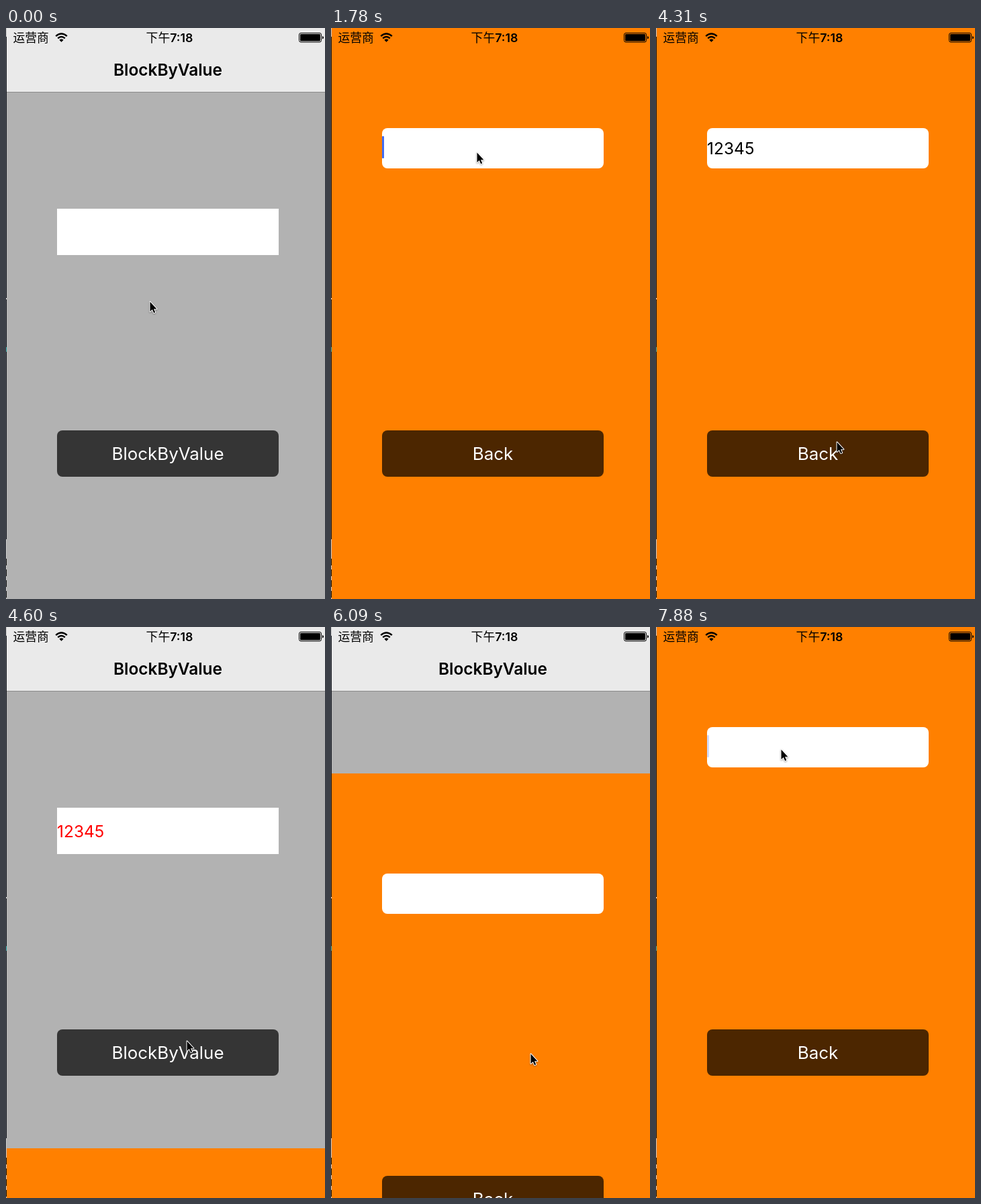
Animation of 475x850 px, one loop 8 s. Source, as an HTML page:

```html
<!DOCTYPE html>
<html lang="zh-CN">
<head>
<meta charset="utf-8">
<title>BlockByValue</title>
<style>
  html, body { margin: 0; width: 100%; height: 100%; overflow: hidden; background: #b2b2b2; }
  svg { display: block; width: 475px; height: 850px; }
  text { font-family: Inter, "Noto Sans CJK SC", "Noto Sans CJK", sans-serif; }
  .mid { text-anchor: middle; }
  .btn { fill: #000; fill-opacity: .7; }
  .btn-text { font-size: 25.9px; fill: #fff; }
  .value { font-size: 24.5px; }
  .status { font-size: 17.8px; }

  /* Every change is a hard step on one 8 s clock */
  .sheet, .label, .digit, .caret, .pointer { animation: 8s step-end infinite; }
  .sheet { animation-name: sheet; }
  .label { animation-name: label; }
  .digit { animation-name: digit; animation-delay: calc(var(--late) - 8s); }
  .caret { animation-name: caret-move, caret-blink; }
  .pointer { animation-name: pointer; }

  @keyframes sheet {
    0% { transform: translateY(850px); }
    11% { transform: translateY(240.5px); }
    12.875% { transform: translateY(28px); }
    14.75% { transform: translateY(3px); }
    16.625% { transform: translateY(0); }
    55.625% { transform: translateY(326px); }
    57.5% { transform: translateY(776px); }
    59.375% { transform: translateY(843px); }
    61.25% { transform: translateY(850px); }
    76.125% { transform: translateY(218px); }
    78% { transform: translateY(25px); }
    79.875% { transform: translateY(2px); }
    81.625%, 100% { transform: translateY(0); }
  }
  @keyframes label {
    0% { visibility: hidden; }
    55.625%, 100% { visibility: visible; }
  }
  /* Each digit goes out again while the sheet is off screen */
  @keyframes digit {
    0% { visibility: hidden; }
    31.625% { visibility: visible; }
    62.875%, 100% { visibility: hidden; }
  }
  @keyframes caret-move {
    0% { transform: translateX(0); }
    31.625% { transform: translateX(10px); }
    35.375% { transform: translateX(25px); }
    39.125% { transform: translateX(40px); }
    40.875% { transform: translateX(56px); }
    44.625% { transform: translateX(71px); }
    62%, 100% { transform: translateX(0); }
  }
  @keyframes caret-blink {
    0% { opacity: 0; }
    22.25% { opacity: 1; }
    29.75% { opacity: .25; }
    31.625% { opacity: 1; }
    52% { opacity: 0; }
    91% { opacity: 1; }
    98.5%, 100% { opacity: .25; }
  }
  @keyframes pointer {
    0% { transform: translate(214px, 407px); }
    1.875% { transform: translate(208px, 432px); }
    3.75% { transform: translate(224px, 530px); }
    5.5% { transform: translate(264px, 622px); }
    7.25% { transform: translate(252px, 627px); }
    12.875% { transform: translate(250px, 570px); }
    14.75% { transform: translate(236px, 360px); }
    16.625% { transform: translate(222px, 215px); }
    18.5% { transform: translate(217px, 185px); }
    46.5% { transform: translate(220px, 215px); }
    48.375% { transform: translate(240px, 380px); }
    50.25% { transform: translate(262px, 560px); }
    52% { transform: translate(269px, 616px); }
    63.125% { transform: translate(272px, 618px); }
    64.875% { transform: translate(280px, 624px); }
    66.75% { transform: translate(288px, 630px); }
    68.625% { transform: translate(294px, 634px); }
    70.5% { transform: translate(297px, 635px); }
    78% { transform: translate(284px, 560px); }
    79.875% { transform: translate(243px, 340px); }
    81.625% { transform: translate(206px, 170px); }
    83.5% { transform: translate(194px, 116px); }
    87.25% { transform: translate(190px, 155px); }
    89.125%, 100% { transform: translate(186px, 182px); }
  }
</style>
</head>
<body>
<svg viewBox="0 0 475 850">
  <!-- first screen -->
  <rect width="475" height="850" fill="#b2b2b2"/>
  <rect width="475" height="95" fill="#eaeaea"/>
  <rect y="95" width="475" height="1" fill="#8b8b8b"/>
  <text class="mid" x="241" y="71" font-size="24.4" font-weight="600">BlockByValue</text>
  <rect x="76" y="269" width="330" height="69" fill="#fff"/>
  <text class="value label" x="76" y="313" fill="#f00">12345</text>
  <rect class="btn" x="76" y="599" width="330" height="69" rx="8"/>
  <text class="mid btn-text" x="241" y="643">BlockByValue</text>

  <!-- second screen -->
  <g class="sheet">
    <rect width="475" height="850" fill="#ff8000"/>
    <rect x="76" y="149" width="330" height="60" rx="8" fill="#fff"/>
    <text class="value" x="76" y="187.5"><tspan class="digit" style="--late:0s">1</tspan><tspan class="digit" style="--late:.3s">2</tspan><tspan class="digit" style="--late:.6s">3</tspan><tspan class="digit" style="--late:.74s">4</tspan><tspan class="digit" style="--late:1.04s">5</tspan></text>
    <rect class="caret" x="76" y="161" width="3" height="33" rx="1" fill="#426bf2"/>
    <rect class="btn" x="76" y="599" width="330" height="69" rx="8"/>
    <text class="mid btn-text" x="241" y="643">Back</text>
  </g>

  <!-- status bar -->
  <text class="status" x="10.5" y="21">运营商</text>
  <g fill="none" stroke="#000" stroke-width="2.4">
    <path d="M74.2 12.2Q82.5 4.6 90.8 12.2"/>
    <path d="M77.2 15.4Q82.5 10.6 87.8 15.4"/>
  </g>
  <path d="M79.4 17.7Q82.5 15.2 85.6 17.7L82.5 21Z"/>
  <text class="mid status" x="243.5" y="21" font-weight="500">下午<tspan font-weight="600">7:18</tspan></text>
  <rect x="436.5" y="7.5" width="33" height="13.5" rx="2.5" fill="none" stroke="#000"/>
  <rect x="438" y="9" width="30" height="10.5" rx="1.2"/>
  <path d="M471 12Q473 12.4 473 14.3T471 16.6Z"/>

  <!-- strip of desktop beside the phone -->
  <rect width="1" height="850" fill="#c4c4c4"/>
  <rect y="13" width="1" height="748" fill="#11141c"/>
  <rect y="402" width="1" height="2" fill="#ddd"/>
  <rect y="475" width="1" height="7" fill="#1b9a9a"/>
  <path d="M.5 790V850" stroke="#111" stroke-dasharray="10 6"/>

  <g class="pointer">
    <path d="M.5 .5V15L3.8 12L6.2 17.2L8.2 16.3L6 11.2H10.4Z" stroke="#fff" stroke-width="2" stroke-linejoin="round" paint-order="stroke" style="filter:drop-shadow(0 1px 1px rgba(0,0,0,.35))"/>
  </g>
</svg>
</body>
</html>
```
